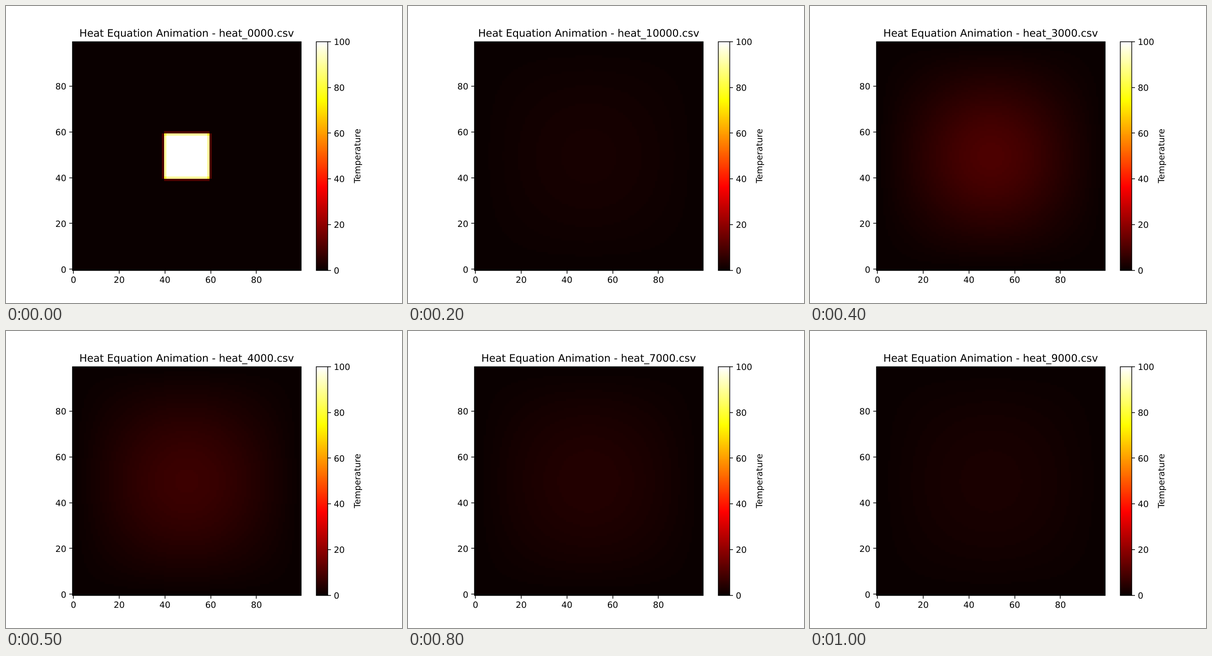
An HTML page with a canvas that plays this animation: 864x648 px, repeating every 1.1 s.

```html
<!DOCTYPE html>
<html lang="en">
<head>
<meta charset="utf-8">
<title>Heat Equation</title>
<style>
  html, body { margin: 0; width: 100%; height: 100%; overflow: hidden; background: #fff; }
  canvas, svg { position: absolute; left: 0; top: 0; width: 864px; height: 648px; }
  text { font: 18.75px "DejaVu Sans", sans-serif; text-rendering: geometricPrecision; }
  #title { font-size: 22.5px; }
  .lines { fill: none; stroke: #000; stroke-width: 1.5; }
</style>
</head>
<body>
<canvas id="field" width="864" height="648"></canvas>
<svg viewBox="0 0 864 648">
  <text id="title" x="394.2" y="67" text-anchor="middle"></text>
  <path class="lines" id="ticks"/>
  <g id="labels"></g>
  <path class="lines" d="M145 78H644V577H145ZM677 78H702V577H677Z"/>
  <text transform="translate(772.6 327.2) rotate(-90)" text-anchor="middle">Temperature</text>
</svg>
<script>
const CELLS = 100, HALF = CELLS / 2, RATE = 0.1;
const LOOP = 1100, FRAME = 100;
const SIDE = 498.96, LEFT = 144.72, BOTTOM = 576.72, CELL = SIDE / CELLS;
// File names come in alphabetical order, so 10000 follows 1000.
const ORDER = [0, 1, 10, 2, 3, 4, 5, 6, 7, 8, 9];

const byId = id => document.getElementById(id);
const ctx = byId("field").getContext("2d");
const clamp01 = v => Math.min(1, Math.max(0, v));

// Black - red - yellow - white ramp with 256 levels
const ramp = Array.from({ length: 256 }, (_, i) => {
  const x = i / 255, a = 0.365079, b = 0.746032;
  const r = 0.0416 + (1 - 0.0416) * clamp01(x / a);
  const rgb = [r, clamp01((x - a) / (b - a)), clamp01((x - b) / (1 - b))];
  return `rgb(${rgb.map(c => Math.floor(c * 255 + 1e-6))})`;
});
const colorOf = t => ramp[Math.min(255, Math.floor(t * 2.56 + 1e-9))];

// Explicit heat steps on one quadrant; the far edges mirror, the outer ones stay at 0.
function simulate() {
  const w = HALF + 1, states = [];
  let now = new Float64Array(w * w), next = new Float64Array(w * w);
  for (let y = 40; y < w; y++) now.fill(100, y * w + 40, y * w + w);
  for (let step = 0; step <= 10000; step++) {
    for (let y = 1; y < HALF; y++) {
      for (let x = 1; x < HALF; x++) {
        const k = y * w + x;
        next[k] = now[k] + RATE * (now[k - 1] + now[k + 1] + now[k - w] + now[k + w] - 4 * now[k]);
      }
      next[y * w + HALF] = next[y * w + HALF - 1];
    }
    next.copyWithin(HALF * w, (HALF - 1) * w, HALF * w);
    [now, next] = [next, now];
    if (step % 1000 === 0) states.push(now.slice());
  }
  return states;
}

function drawField(state) {
  const fold = i => Math.min(i, CELLS - 1 - i);
  const edge = i => Math.round(i * CELL);
  for (let y = 0; y < CELLS; y++) {
    for (let x = 0; x < CELLS; x++) {
      ctx.fillStyle = colorOf(state[fold(y) * (HALF + 1) + fold(x)]);
      ctx.fillRect(145 + edge(x), 577 - edge(y + 1), edge(x + 1) - edge(x), edge(y + 1) - edge(y));
    }
  }
}

function drawAxes() {
  let ticks = "", labels = "";
  const label = (x, y, anchor, value) =>
    labels += `<text x="${x}" y="${Math.round(y)}" text-anchor="${anchor}">${value}</text>`;
  for (let v = 0; v <= 100; v += 20) {
    const barY = BOTTOM - v * CELL;
    ticks += `M702 ${Math.round(barY)}h7`;
    label(715.2, barY + 7.3, "start", v);
    if (v === 100) break;
    const offset = (v + 0.5) * CELL, x = LEFT + offset, y = BOTTOM - offset;
    ticks += `M${Math.round(x)} 577v7M145 ${Math.round(y)}h-7`;
    label(x, 604, "middle", v);
    label(131.6, y + 7.3, "end", v);
  }
  byId("ticks").setAttribute("d", ticks);
  byId("labels").innerHTML = labels;

  const level = i => Math.round(BOTTOM - i * SIDE / 256);
  ramp.forEach((color, i) => {
    ctx.fillStyle = color;
    ctx.fillRect(677, level(i + 1), 25, level(i) - level(i + 1));
  });
}

const states = simulate();
let shown = -1;

function render(time) {
  const slot = Math.floor((time % LOOP) / FRAME);
  if (slot !== shown) {
    shown = slot;
    const n = ORDER[slot];
    drawField(states[n]);
    byId("title").textContent =
      `Heat Equation Animation - heat_${String(n * 1000).padStart(4, "0")}.csv`;
  }
  requestAnimationFrame(render);
}

drawAxes();
requestAnimationFrame(render);
</script>
</body>
</html>
```
